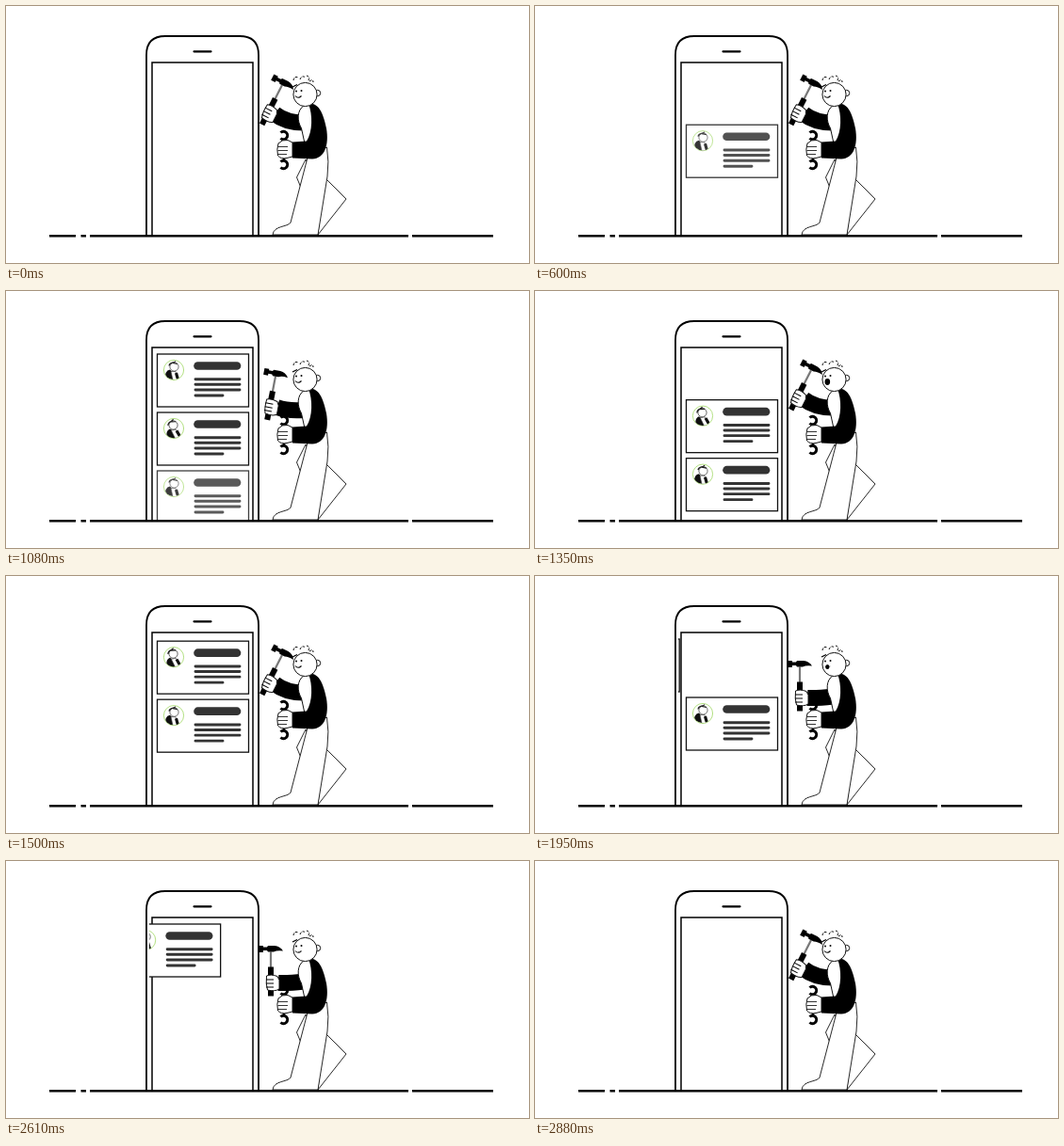
These frames come from a looping animation (555x273 px, 3420 ms). An HTML page:

```html
<!DOCTYPE html>
<html lang="en">
<head>
<meta charset="utf-8">
<title>Phone repair</title>
<style>
  html, body { margin: 0; width: 100%; height: 100%; overflow: hidden; background: #fff; }
  svg { display: block; width: 555px; height: 273px; }
  .line { fill: none; stroke: #000; }
  .thin { fill: #fff; stroke: #111; stroke-width: .9; stroke-linejoin: round; }
  .skin { fill: #fff; stroke: #111; stroke-width: 1; stroke-linejoin: round; }
</style>
</head>
<body>
<svg viewBox="0 0 555 273">
  <defs>
    <clipPath id="screen"><rect x="152" y="60" width="110" height="183"/></clipPath>
    <clipPath id="round"><circle cx="18" cy="17.5" r="10.2"/></clipPath>
    <g id="card">
      <rect x=".5" y=".5" width="97" height="56" fill="#fff" stroke="#111" stroke-width="1.3"/>
      <g stroke="#333" stroke-linecap="round" fill="none">
        <path d="M43.5 13H85" stroke-width="8.6"/>
        <path d="M41 27.3H88M41 32.8H88M41 38.500H88M41 44.500H70" stroke-width="2.9"/>
      </g>
      <circle cx="18" cy="17.5" r="10.6" fill="#fff" stroke="#b4e184" stroke-width="1"/>
    </g>
    <g id="bust" clip-path="url(#round)">
      <path d="M9 28Q8 18 14 17Q18 20 17 28Z" fill="#111"/>
      <path d="M15 19L20 19L22 28H17Z" fill="#fff" stroke="#333" stroke-width=".6"/>
      <path d="M19 21L22 20L24 27L21 28Z" fill="#111"/>
      <circle cx="18.5" cy="14" r="4.6" fill="#fff" stroke="#333" stroke-width=".7"/>
      <path d="M13 13C14 8 18 11 20 8M17 10L22 11" stroke="#222" stroke-width="1.2" fill="none"/>
    </g>
  </defs>

  <rect width="555" height="273" fill="#fff"/>

  <!-- phone -->
  <path class="line" d="M149 243V52Q149 32 169 32H248Q268 32 268 52V243" stroke-width="1.8"/>
  <path class="line" d="M155 243V60H262V243" stroke-width="1.5"/>
  <path class="line" d="M199.5 48.3H217.5" stroke-width="2.2" stroke-linecap="round"/>
  <g id="cards" clip-path="url(#screen)"></g>

  <!-- legs -->
  <path class="thin" d="M318 163L308.5 182L313 193L326 180Z"/>
  <path class="thin" d="M337 181L361 205L331 243Z"/>
  <path class="thin" d="M320 161L302 230C299 235 284 233 283 243H331L341 181Q343 165 340.5 150Z"/>

  <path class="line" d="M46 244.2H74M79.5 244.2H85M89 244.2H427M431 244.2H517" stroke-width="2.6"/>

  <!-- wrench -->
  <g class="line" stroke-width="3">
    <path d="M291.5 134.5A4.2 4.2 0 1 1 291.5 140.5"/>
    <path d="M295 142V163" stroke-width="2.6"/>
    <path d="M291.5 165.500A4.2 4.2 0 1 1 291.5 171.500"/>
  </g>

  <!-- torso -->
  <path id="sleeve" class="line" stroke-width="17"/>
  <path class="skin" d="M317 105C308 111 309 122 313.5 130L317 146L327 144L328 106Z"/>
  <path d="M321 104C332 102 337 115 340 130C343 148 338 162 325 162.5L304 161.5V144.5L319 143.5C325.5 134 325.5 115 321 104Z"/>
  <path class="skin" d="M304 145L299 142.5Q293 141.5 289 146Q287 152 288.5 159Q292 163 298 161.5L304 160Z"/>
  <path class="line" d="M289 149.5H299M288.5 153.5H299M288.5 157.5H298" stroke-width=".8"/>

  <!-- head -->
  <circle class="skin" cx="330.5" cy="92.5" r="3.2"/>
  <circle class="skin" cx="317.5" cy="94" r="12.6"/>
  <path class="line" d="M305 79Q306 74 310 76M312 78Q314 73 318 76M319 74Q323 75 321 79M322 80Q326 77 326 81" stroke-width="1" stroke-dasharray="2.5 1.5"/>
  <path class="line" d="M304 86L309 83.5" stroke-width="1.3"/>
  <circle cx="308" cy="90.5" r="1"/><circle cx="313.5" cy="90" r="1"/>
  <path id="smile" class="line" d="M307 95.5Q310 99 313.5 95.5" stroke-width="1.1"/>
  <ellipse id="mouth" rx="2.8" ry="3.4"/>

  <!-- hammer -->
  <g id="hammer">
    <path d="M0 -33V-14" stroke="#777" stroke-width="2.2"/>
    <path d="M0 -17V14" stroke="#000" stroke-width="6"/>
    <path d="M-13 -39.5H-8V-38H-4L-3 -39.5H4Q10 -39 13 -34Q7 -35 3 -33H-3L-4 -34.5H-8V-32.5H-13Z"/>
    <path class="skin" d="M-4.5 -7.5Q0 -9.5 7 -7L9 -3V6.5Q4 9.5 -3.5 7.5Q-5.5 1 -4.5 -7.5Z"/>
    <path class="line" d="M-5 -3.5H3M-5 .5H3M-5 4.5H3" stroke-width="1"/>
  </g>
</svg>
<script>
const LOOP = 3420;
const $ = id => document.getElementById(id);
const mix = (a, b, p) => a + (b - a) * p;
const span = (t, a, b) => Math.min(1, Math.max(0, (t - a) / (b - a)));
const easeIn = p => p * p;
const easeOut = p => 1 - (1 - p) * (1 - p);

// One hammer blow per card: start time and slowness
const blows = [{ at: 960, slow: 1.2 }, { at: 1685, slow: 1.2 }, { at: 2465, slow: 1 }];

const cards = blows.map((_, i) => {
  const g = document.createElementNS('http://www.w3.org/2000/svg', 'g');
  const turn = i === 1 ? 'rotate(-14 18 18)' : '';
  g.innerHTML = `<use href="#card"/><use href="#bust" transform="${turn}"/>`;
  return $('cards').appendChild(g);
});

// Top of the first card; the others follow 62px apart
const stackTop = t =>
  172 - 105.5 * span(t, 375, 890) - 62 * span(t, 1308, 1508) - 62 * span(t, 2220, 2400);

function draw(t) {
  let swing = 0, open = 0;
  blows.forEach(({ at, slow }, i) => {
    const u = (t - at) / slow;
    swing += easeIn(span(u, 0, 130)) - easeOut(span(u, 260, 330));
    open += span(u, 130, 250) - span(u, 370, 415);

    const x = 160 - 106 * easeOut(span(u, 130, 235));
    const start = 365 + 245 * i;
    cards[i].setAttribute('transform', `translate(${x} ${stackTop(t) + 62 * i})`);
    cards[i].setAttribute('opacity', u >= 235 ? 0 : span(t, start, start + 280));
  });

  const hx = mix(278, 281, swing), hy = mix(113.5, 129.5, swing);
  $('hammer').setAttribute('transform', `translate(${hx} ${hy}) rotate(${mix(27, 0, swing)})`);
  $('sleeve').setAttribute('d',
    `M${hx + mix(7, 8, swing)} ${hy + mix(1, 0, swing)}Q${mix(297, 300, swing)} ${mix(124, 130, swing)} 316 ${mix(124, 128, swing)}`);
  $('mouth').setAttribute('transform', `translate(310.3 96.5) scale(${open})`);
  $('smile').setAttribute('opacity', 1 - open);
}

function tick() {
  draw(performance.now() % LOOP);
  requestAnimationFrame(tick);
}
tick();
</script>
</body>
</html>
```
